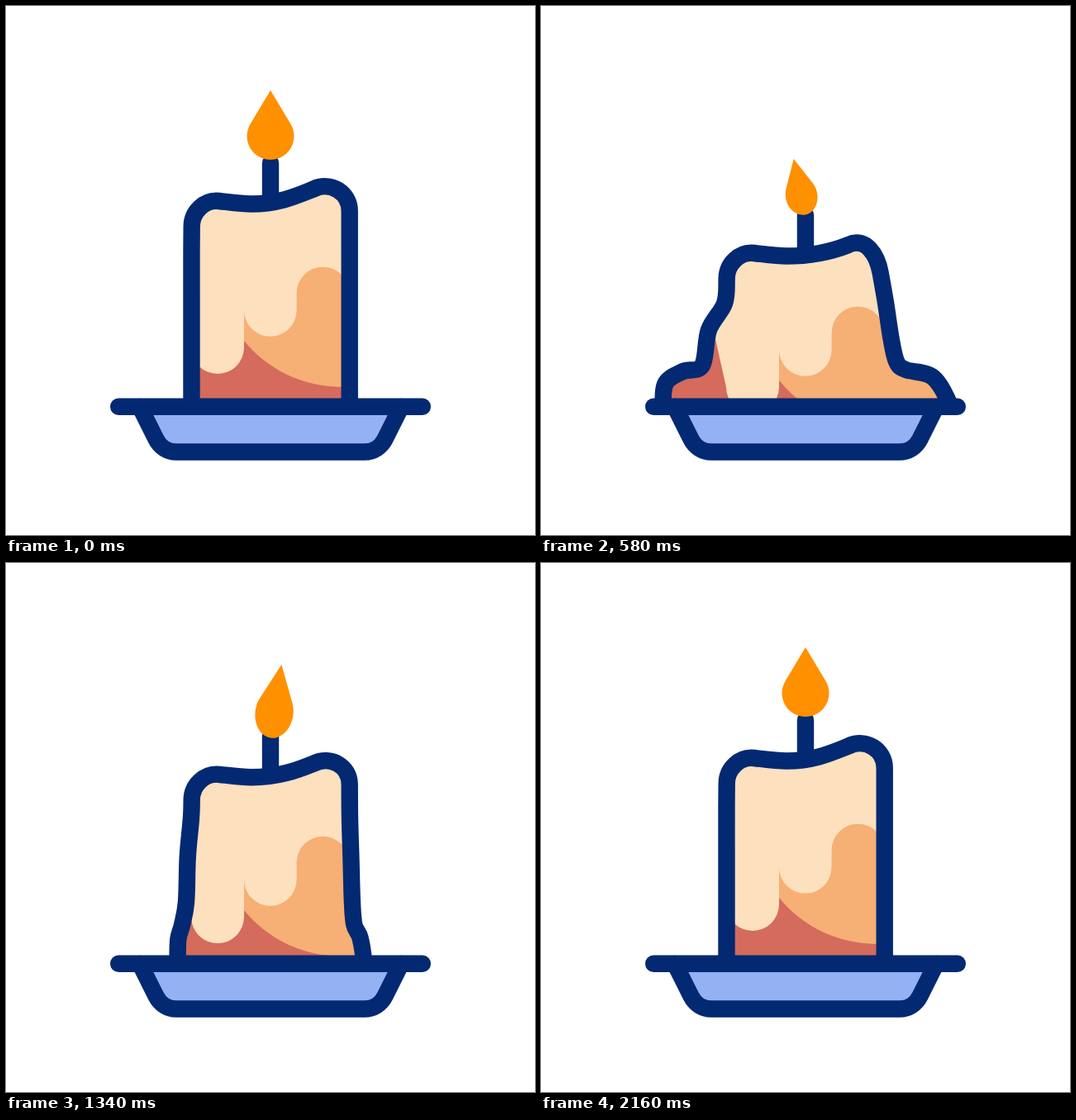
These frames come from a looping animation (640x640 px, 2400 ms). An HTML page with a canvas:

```html
<!DOCTYPE html>
<html lang="en">
<head>
<meta charset="utf-8">
<title>Melting candle</title>
<style>
  html, body { margin: 0; height: 100%; overflow: hidden; background: #fff; }
  canvas { display: block; width: 100vw; height: 100vh; }
</style>
</head>
<body>
<canvas width="640" height="640"></canvas>
<script>
const ctx = document.querySelector('canvas').getContext('2d');
const LOOP = 2400, FLOOR = 484;
const NAVY = '#022972', CREAM = '#fde0be', ORANGE = '#f6af74', RED = '#d46b5c',
      BLUE = '#94b1f3', FLAME = '#ff9000';

// Each side from the foot upwards: heights on the straight candle, points when molten
const heights = [FLOOR, 455, 437, 403, 345, 295];
const leftMelt = [[147.5, FLOOR], [151, 456], [172, 442], [195, 435], [203, 392], [222, 360]];
const rightMelt = [[495, FLOOR], [474, 449], [441, 440], [430, 430], [423.5, 402], [417, 359]];

const mix = (a, b, u) => a + (b - a) * u;
const ease = u => (1 - Math.cos(Math.PI * Math.min(1, Math.max(0, u)))) / 2;

// Eases from stop to stop, each stop being [time, value]
function glide(t, ...stops) {
  let value = stops[0][1];
  for (let i = 1; i < stops.length; i++) {
    const [from, a] = stops[i - 1], [to, b] = stops[i];
    value += (b - a) * ease((t - from) / (to - from));
  }
  return value;
}

const side = (x, molten, spread) => molten.map(([mx, my], i) =>
  [mix(x, mx, spread), mix(heights[i], my, spread)]);

// Smooth curve from points[1] to the last but one; the ends only steer
function spline(path, points) {
  for (let i = 1; i < points.length - 2; i++) {
    const [a, b, c, d] = points.slice(i - 1, i + 3);
    path.bezierCurveTo(b[0] + (c[0] - a[0]) / 6, b[1] + (c[1] - a[1]) / 6,
      c[0] - (d[0] - b[0]) / 6, c[1] - (d[1] - b[1]) / 6, ...c);
  }
}

function waxPath(drop, spread, lean) {
  const path = new Path2D();
  const left = side(224.5, leftMelt, spread);
  const right = side(415.7, rightMelt, spread).reverse();
  const below = ([x, y]) => [x, y + 26];
  const top = 267 + drop, y = 236 + drop, peak = 221.5 + drop * 1.07;
  const rx = 415.7 - 5 * lean, ry = 248 + drop + 12 * lean;

  path.moveTo(...left[0]);
  spline(path, [below(left[0]), ...left, [224.7, top], [224.7, top - 20]]);
  path.bezierCurveTo(224.7, top - 18, 240, y - 2, 258, y);
  path.bezierCurveTo(271, y + 1.5, 284, y + 3.5, 297, y + 3.5);
  path.bezierCurveTo(330, y + 3.5, 352, peak + 8, 372, peak);
  path.bezierCurveTo(393, peak - 10, rx - 4 * lean, ry - 22, rx, ry);
  spline(path, [[rx - 7 * lean, ry - 40], [rx, ry], ...right, below(right[5])]);
  return path;
}

const orangeWax = new Path2D('M288 300V405C315 438 356 461 410 461H560V300Z');
const creamWax = new Path2D('M150 100V330L211 355L224 413A32 32 0 0 0 288 413V368' +
  'A31.8 31.8 0 0 0 351.6 368V347.5A31.8 31.8 0 0 1 415.2 347.5H560V100Z');
const bowl = new Path2D('M162 485L181.5 524C186.3 533.6 195.5 539.5 206 539.5H434' +
  'C444.5 539.5 453.7 533.6 458.5 524L478 485');
const rim = new Path2D('M136.2 484.8H503.8');
const wick = new Path2D('M320 190V230');
const flame = new Path2D('M0 -84L-24.4 -43.2A28.5 28.5 0 1 0 24.4 -43.2Z');

function fill(path, color) {
  ctx.fillStyle = color;
  ctx.fill(path);
}

function shifted(dy, draw) {
  ctx.save();
  ctx.translate(0, dy);
  draw();
  ctx.restore();
}

function drawFlame(t) {
  const tilt = glide(t, [0, 0], [580, -12], [1060, 14.4], [1700, 0]);
  const sink = glide(t, [0, 0], [1060, 6], [1300, 6], [1600, 0]);
  const width = glide(t, [0, 57], [580, 38.5], [1060, 56], [1340, 46], [2160, 57]);
  const length = glide(t, [0, 84], [320, 90], [580, 69], [1200, 91], [1300, 91],
    [1580, 64], [1700, 64], [2160, 84]);
  ctx.translate(320, 186 + sink);
  ctx.rotate(tilt * Math.PI / 180);
  ctx.scale(width / 57, length / 84);
  fill(flame, FLAME);
}

function draw(t) {
  const melt = glide(t, [0, 0], [580, 1], [990, 1], [1555, 0]);
  const spread = glide(t, [0, 0], [524, 1], [700, 1], [1630, 0]);
  const lean = glide(t, [0, 0], [300, 1], [600, 1], [1060, 0]);
  const wax = waxPath(63 * melt, spread, lean);

  ctx.fillStyle = '#fff';
  ctx.fillRect(0, 0, 640, 640);
  ctx.strokeStyle = NAVY;
  ctx.lineWidth = 20.4;
  ctx.lineJoin = 'round';

  ctx.save();
  ctx.clip(wax);
  ctx.fillStyle = RED;
  ctx.fillRect(0, 0, 640, 640);
  shifted(48 * melt, () => {
    fill(orangeWax, ORANGE);
    fill(creamWax, CREAM);
  });
  ctx.restore();

  ctx.lineCap = 'butt';
  ctx.stroke(wax);
  ctx.lineCap = 'round';
  shifted(63 * melt, () => {
    ctx.stroke(wick);
    drawFlame(t);
  });

  fill(bowl, BLUE);
  ctx.stroke(bowl);
  ctx.stroke(rim);
}

const start = performance.now();
function tick() {
  draw((performance.now() - start) % LOOP);
  requestAnimationFrame(tick);
}
tick();
</script>
</body>
</html>
```
